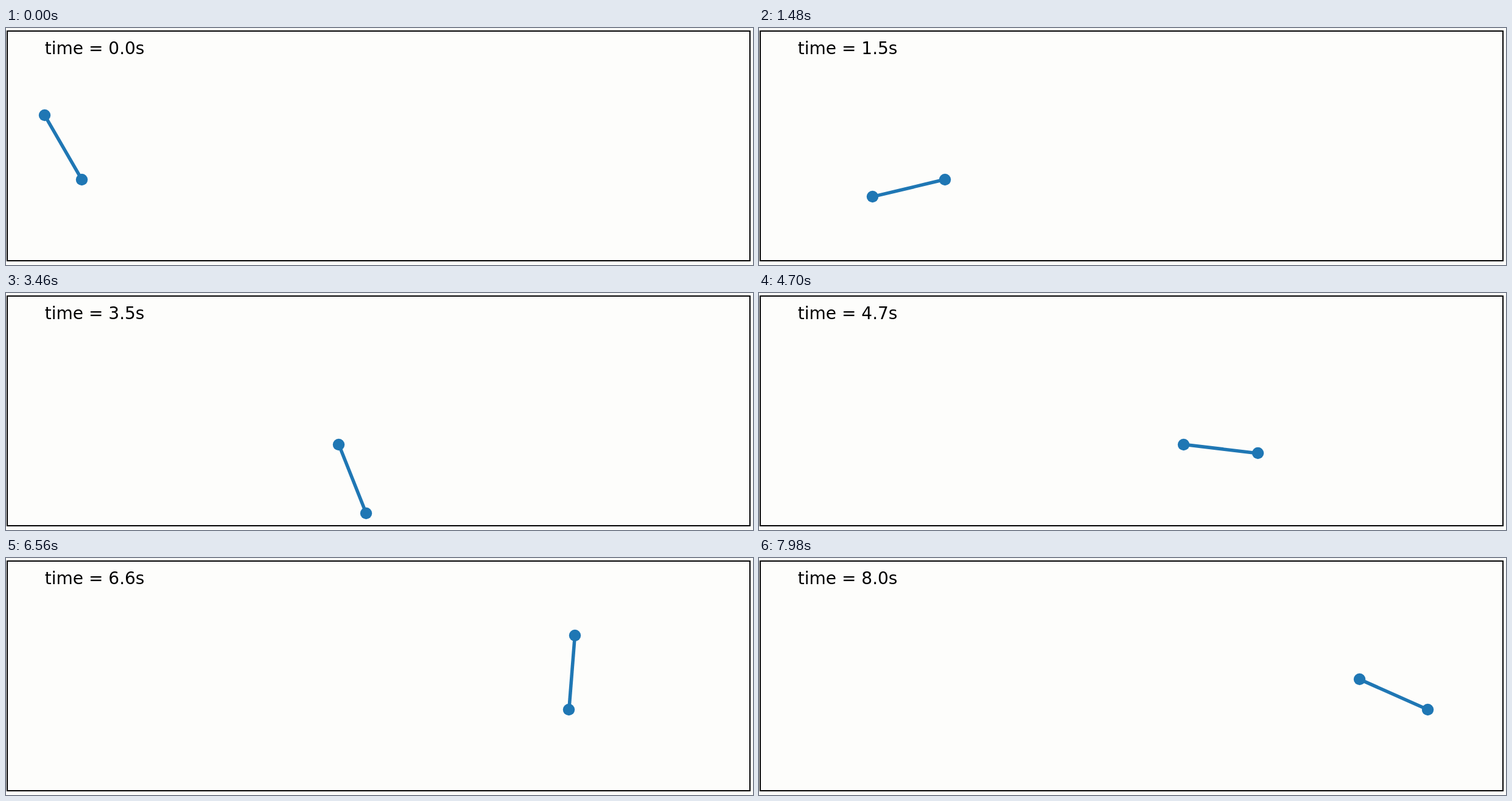
Write an HTML page that moves like this. It is 1227 by 390 pixels and loops after 8 s.

```html
<!DOCTYPE html>
<html lang="en">
<head>
<meta charset="utf-8">
<title>Rolling rod</title>
<style>
  html, body { margin: 0; width: 100%; height: 100%; overflow: hidden; background: #fdfdfb; }
  svg { display: block; width: 100%; height: 100%; }
</style>
</head>
<body>
<svg viewBox="0 0 1227 390">
  <rect x="2" y="5" width="1220" height="378" fill="none" stroke="#000" stroke-width="2"/>
  <line id="rod" stroke="#1f77b4" stroke-width="5.56"/>
  <circle id="pivot" r="9.72" fill="#1f77b4"/>
  <circle id="bob" r="9.72" fill="#1f77b4"/>
  <text id="label" x="63.8" y="43" font-family="'DejaVu Sans', sans-serif" font-size="28"></text>
</svg>
<script>
const LOOP = 8000, STEP = 20;
const UNIT = 122;                     // pixels per metre
const START = { x: 124.5, y: 249.3 };
const SPEED = 1;                      // pivot, metres per second
const ANGLE = -5 * Math.PI / 6;       // measured from straight down
const SPIN = Math.cos(Math.PI / 6);   // radians per second

const [rod, pivot, bob, label] =
  ['rod', 'pivot', 'bob', 'label'].map(id => document.getElementById(id));

function set(el, attrs) {
  for (const key in attrs) el.setAttribute(key, attrs[key]);
}

// Discs sit on pixel centres; the rod moves freely.
const snap = v => Math.floor(v) + 0.5;

function draw(ms) {
  const t = Math.floor(ms % LOOP / STEP) * STEP / 1000;
  const angle = ANGLE + SPIN * t;
  const px = START.x + UNIT * SPEED * t, py = START.y;
  const bx = px + UNIT * Math.sin(angle);
  const by = py + UNIT * Math.cos(angle);
  set(rod, { x1: px, y1: py, x2: bx, y2: by });
  set(pivot, { cx: snap(px), cy: snap(py) });
  set(bob, { cx: snap(bx), cy: snap(by) });
  label.textContent = `time = ${t.toFixed(1)}s`;
}

let begin;
function tick(now) {
  begin ??= now;
  draw(Math.max(0, now - begin));
  requestAnimationFrame(tick);
}
draw(0);
requestAnimationFrame(tick);
</script>
</body>
</html>
```
